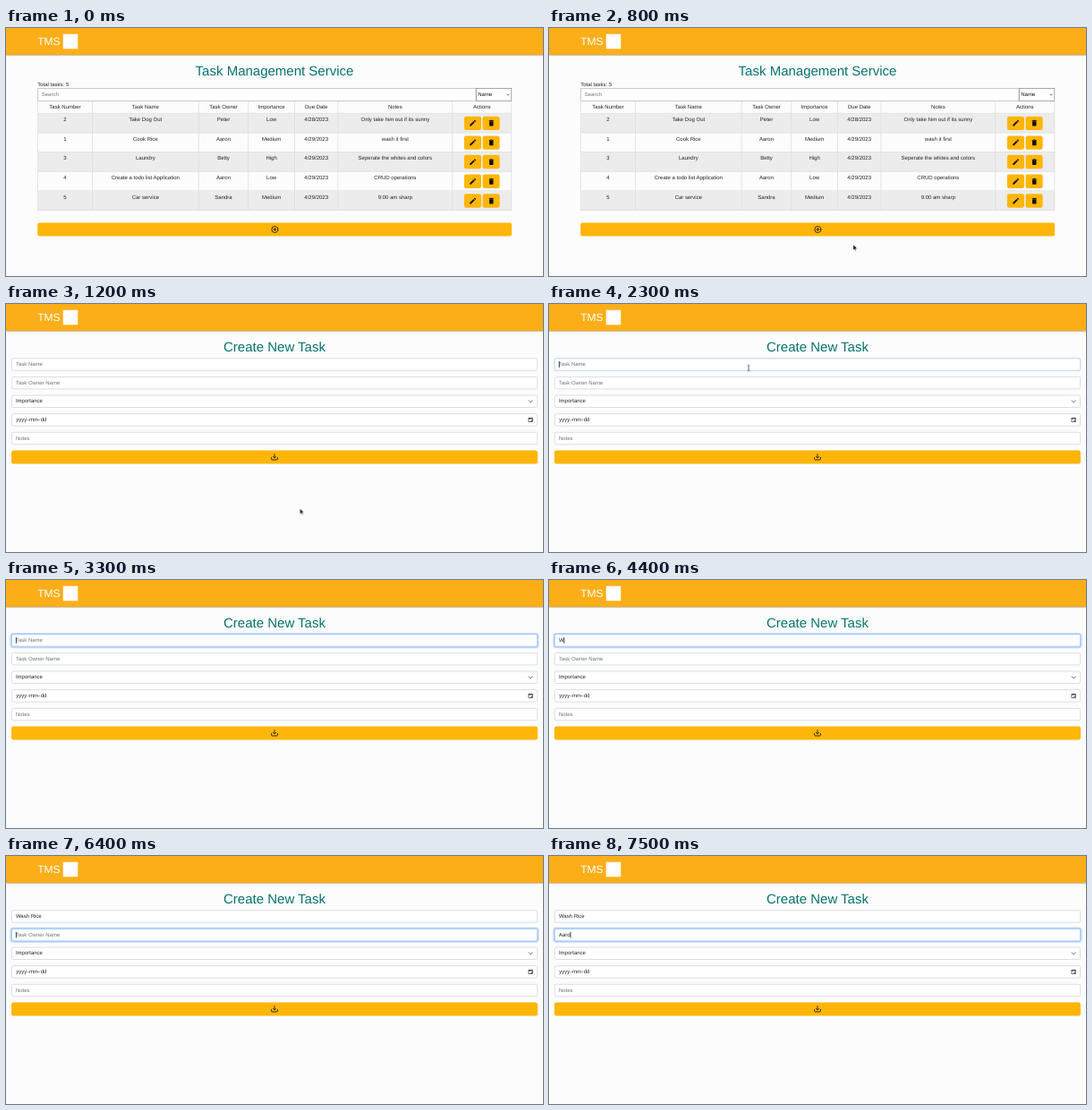
Write an HTML page that moves like this. It is 600 by 277 pixels and loops after 8 s.

```html
<!DOCTYPE html>
<html lang="en">
<head>
<meta charset="utf-8">
<title>Task Management Service</title>
<style>
  html, body { margin: 0; width: 100%; height: 100%; overflow: hidden; background: #fcfcfc; }
  * { box-sizing: border-box; }

  /* The page is laid out 1600 wide and shown at 600. */
  #stage { position: absolute; left: 0; top: 0; width: 600px; height: 277px; overflow: hidden; }
  #app {
    position: absolute; left: 0; top: 0; width: 1600px; height: 739px;
    transform: scale(.375); transform-origin: 0 0;
    font: 16px/24px "Liberation Sans", Arial, sans-serif;
    text-rendering: geometricPrecision; color: #212529;
  }
  nav {
    position: absolute; inset: 0 0 auto; height: 80px;
    background: #fcae18; box-shadow: 0 2px 4px #4a3d14c0;
  }
  nav b { position: absolute; left: 94px; top: 20px; font: 32px/40px "Liberation Sans", Arial, sans-serif; color: #fff; }
  nav i { position: absolute; left: 170px; top: 18px; width: 44px; height: 44px; background: #fff; }

  .page, h1 { position: absolute; left: 0; width: 100%; }
  .page { top: 0; height: 100%; }
  h1 { top: 104px; margin: 0; font-size: 40px; line-height: 48px; font-weight: 400; text-align: center; color: #08736f; }
  .btn { display: flex; align-items: center; justify-content: center; background: #ffb608; border-radius: 6px; color: #111; }
  svg.icon { width: 24px; height: 24px; fill: currentColor; }
  svg.line { fill: none; stroke: currentColor; stroke-width: 2.2; stroke-linecap: round; stroke-linejoin: round; }

  /* List page */
  .total { position: absolute; left: 94px; top: 158px; }
  .search, .sort { position: absolute; top: 179px; height: 39px; line-height: 35px; border: 2px solid #b9b9b9; background: #fff; }
  .search { left: 94px; width: 1307px; padding-left: 10px; color: #757575; }
  .sort { left: 1400px; width: 107px; padding-left: 4px; color: #111; border-color: #8c8c8c; }
  .sort svg { position: absolute; right: 3px; top: 12px; width: 11px; height: 11px; }
  .table { position: absolute; left: 94px; top: 218px; width: 1413px; border-left: 2px solid #dadddf; }
  .row {
    display: grid; height: 57.9px; text-align: center;
    grid-template-columns: 162px 317px 148px 138px 129px 341px 176px;
  }
  .row > * { border: solid #dadddf; border-width: 0 2px 2px 0; padding-top: 7px; }
  .row.head { height: 36.7px; }
  .head > * { padding-top: 6px; }
  .row:nth-child(even) { background: #ececec; }
  .row .acts { display: flex; justify-content: center; gap: 4px; padding-top: 8px; }
  .acts .btn { width: 51px; height: 41px; }
  .add { position: absolute; left: 94px; top: 580px; width: 1413px; height: 40px; }

  /* Form page */
  .form { position: absolute; left: 16px; top: 160.5px; width: 1568px; display: flex; flex-direction: column; gap: 17.2px; }
  .form .btn { height: 40px; }
  .field {
    position: relative; height: 38px; padding: 5px 11px; white-space: pre;
    border: 2px solid #cfd5da; border-radius: 6px; background: #fff;
  }
  .field svg { position: absolute; right: 11px; top: 9px; width: 16px; height: 16px; }
  .field u { padding: 0 1px; text-decoration: none; }
  .hint { color: #6c757d; }
  .text:not(:empty) ~ .hint { display: none; }
  .caret { position: relative; }
  .caret::after { content: ""; position: absolute; left: 0; top: 0; width: 2px; height: 18px; background: #000; }

  /* Pointer */
  #pointer { position: absolute; left: 0; top: 0; width: 1px; height: 1px; overflow: visible; }

  /* Timeline: 1.25% is 100 ms */
  .list, .create, .add, .field.name, .field.owner, .caret, #pointer, #pointer g { animation: 8s step-end infinite; }
  .list { animation-name: list; }
  .create { animation-name: create; }
  .add { animation-name: hover; }
  .field.name { animation-name: focus-name; }
  .field.owner { animation-name: focus-owner; }
  .name .caret { animation-name: caret-name; }
  .owner .caret { animation-name: caret-owner; }
  #pointer { animation-name: move; }
  #pointer .arrow { animation-name: arrow; }
  #pointer .hand { animation-name: hand; }
  #pointer .beam { animation-name: beam; }

  @keyframes list { 0% { visibility: visible } 15%, 100% { visibility: hidden } }
  @keyframes create { 0% { visibility: hidden } 15%, 100% { visibility: visible } }
  @keyframes hover { 0% { background: #ffb608 } 12.5% { background: #ffbc19 } 13.75%, 100% { background: #fec02a } }
  @keyframes focus-name {
    0%, 80%, 100% { border-color: #cfd5da; box-shadow: none }
    28.75%, 78.75% { border-color: #b0ccf0; box-shadow: 0 0 0 1px #0d6efd20 }
    30% { border-color: #86b7fe; box-shadow: 0 0 0 4px #0d6efd40 }
  }
  @keyframes focus-owner {
    0% { border-color: #cfd5da; box-shadow: none }
    78.75% { border-color: #b0ccf0; box-shadow: 0 0 0 1px #0d6efd20 }
    80%, 100% { border-color: #86b7fe; box-shadow: 0 0 0 4px #0d6efd40 }
  }
  @keyframes caret-name {
    0%, 35%, 46.25%, 78.75%, 100% { opacity: 0 }
    28.75%, 41.25%, 52.5% { opacity: 1 }
  }
  @keyframes caret-owner { 0%, 85% { opacity: 0 } 78.75%, 87.5%, 100% { opacity: 1 } }
  @keyframes move {
    0% { transform: translate(350px, 253px) }
    8.75% { transform: translate(347px, 250px) }
    10% { transform: translate(340px, 242px) }
    11.25% { transform: translate(333px, 234px) }
    12.5% { transform: translate(328.5px, 228.5px) }
    20% { transform: translate(326px, 225px) }
    21.25% { transform: translate(319px, 214px) }
    22.5% { transform: translate(303px, 191px) }
    23.75% { transform: translate(279px, 155px) }
    25% { transform: translate(253px, 116px) }
    26.25% { transform: translate(232px, 84px) }
    27.5%, 100% { transform: translate(223px, 71.5px) }
  }
  @keyframes arrow { 0%, 12.5%, 23.75%, 100% { opacity: 0 } 7.5%, 15% { opacity: 1 } }
  @keyframes hand { 0%, 15%, 100% { opacity: 0 } 12.5% { opacity: 1 } }
  @keyframes beam { 0%, 41.25%, 100% { opacity: 0 } 23.75% { opacity: 1 } }
</style>
</head>
<body>
<div id="stage">
  <div id="app">
    <section class="page list">
      <h1>Task Management Service</h1>
      <div class="total">Total tasks: 5</div>
      <div class="search">Search</div>
      <div class="sort">Name
        <svg viewBox="0 0 16 16" fill="none" stroke="#222" stroke-width="2.5"><path d="m2 5 6 6 6-6"/></svg>
      </div>
      <div class="table"></div>
      <div class="btn add">
        <svg class="icon line" viewBox="0 0 24 24"><circle cx="12" cy="12" r="9.5"/><path d="M12 8v8M8 12h8"/></svg>
      </div>
    </section>

    <section class="page create">
      <h1>Create New Task</h1>
      <div class="form">
        <div class="field name"><span class="text"></span><span class="caret"></span><span class="hint">Task Name</span></div>
        <div class="field owner"><span class="text"></span><span class="caret"></span><span class="hint">Task Owner Name</span></div>
        <div class="field">Importance<svg viewBox="0 0 16 16" fill="none" stroke="#343a40" stroke-width="2"><path d="m2 5 6 6 6-6"/></svg></div>
        <div class="field"><u>yyyy</u>-<u>mm</u>-<u>dd</u><svg viewBox="0 0 16 16" fill="none" stroke="#111" stroke-width="1.7"><path d="M2 3h12v11H2zM2 4.5h12M4.5 1v2M11.5 1v2"/><path d="M9 9h3v3H9z" fill="#111" stroke="none"/></svg></div>
        <div class="field"><span class="hint">Notes</span></div>
        <div class="btn">
          <svg class="icon line" viewBox="0 0 24 24"><path d="M3 13v5a2 2 0 0 0 2 2h14a2 2 0 0 0 2-2v-5M12 3v11M8 10.5l4 4 4-4"/></svg>
        </div>
      </div>
    </section>

    <nav><b>TMS</b><i></i></nav>
  </div>

  <svg id="pointer">
    <g class="arrow"><path d="M0 0v6.3l1.5-1.4 1 2.2.9-.4-1-2.1h2z" fill="#000" stroke="#fff" stroke-width=".5"/></g>
    <g class="hand"><path d="M-.6.1a.6.6 0 0 1 1.2 0v2.3l2.4.5c.5.1.8.5.7 1l-.5 2.6h-3.6l-1.9-2.4c-.4-.6.4-1.1.9-.7l.8.7z" fill="#fff" stroke="#222" stroke-width=".6"/></g>
    <g class="beam"><path d="M-1.3-3.2q1.3 0 1.3.8v4.8q0 .8-1.3.8M1.3-3.2q-1.3 0-1.3.8M0 2.4q0 .8 1.3.8" fill="none" stroke="#333" stroke-width=".7"/></g>
  </svg>
</div>

<script>
  const $ = sel => document.querySelector(sel);

  const heads = ["Task Number", "Task Name", "Task Owner", "Importance", "Due Date", "Notes", "Actions"];
  const tasks = [
    [2, "Take Dog Out", "Peter", "Low", "4/28/2023", "Only take him out if its sunny"],
    [1, "Cook Rice", "Aaron", "Medium", "4/29/2023", "wash it first"],
    [3, "Laundry", "Betty", "High", "4/29/2023", "Seperate the whites and colors"],
    [4, "Create a todo list Application", "Aaron", "Low", "4/29/2023", "CRUD operations"],
    [5, "Car service", "Sandra", "Medium", "4/29/2023", "9:00 am sharp"]
  ];
  const pencil = "M3 17.25V21h3.75L17.81 9.94l-3.75-3.75L3 17.25zM20.71 7.04c.39-.39.39-1.02 0-1.41l-2.34-2.34c-.39-.39-1.02-.39-1.41 0l-1.83 1.83 3.75 3.75 1.83-1.83z";
  const bin = "M6 19c0 1.1.9 2 2 2h8c1.1 0 2-.9 2-2V7H6v12zM19 4h-3.5l-1-1h-5l-1 1H5v2h14V4z";

  const cells = list => list.map(v => `<div>${v}</div>`).join("");
  const button = d => `<div class="btn"><svg class="icon" viewBox="0 0 24 24"><path d="${d}"/></svg></div>`;
  const actions = `<div class="acts">${button(pencil)}${button(bin)}</div>`;
  $(".table").innerHTML = `<div class="row head">${cells(heads)}</div>` +
    tasks.map(task => `<div class="row">${cells(task)}${actions}</div>`).join("");

  // Each entry: the text and the time at which each key is pressed.
  const typing = [
    [$(".name .text"), "Wash Rice", [3300, 4600, 4700, 4900, 5000, 5600, 5900, 6000, 6100]],
    [$(".owner .text"), "Aaron", [7000, 7100, 7200, 7300, 7500]]
  ];

  // Typing follows the clock of the CSS animations.
  const clock = $(".list").getAnimations()[0];
  function draw() {
    const t = (clock.currentTime || 0) % 8000;
    for (const [el, text, keys] of typing) {
      const now = text.slice(0, keys.filter(k => k <= t).length);
      if (el.textContent !== now) el.textContent = now;
    }
    requestAnimationFrame(draw);
  }
  draw();
</script>
</body>
</html>
```
